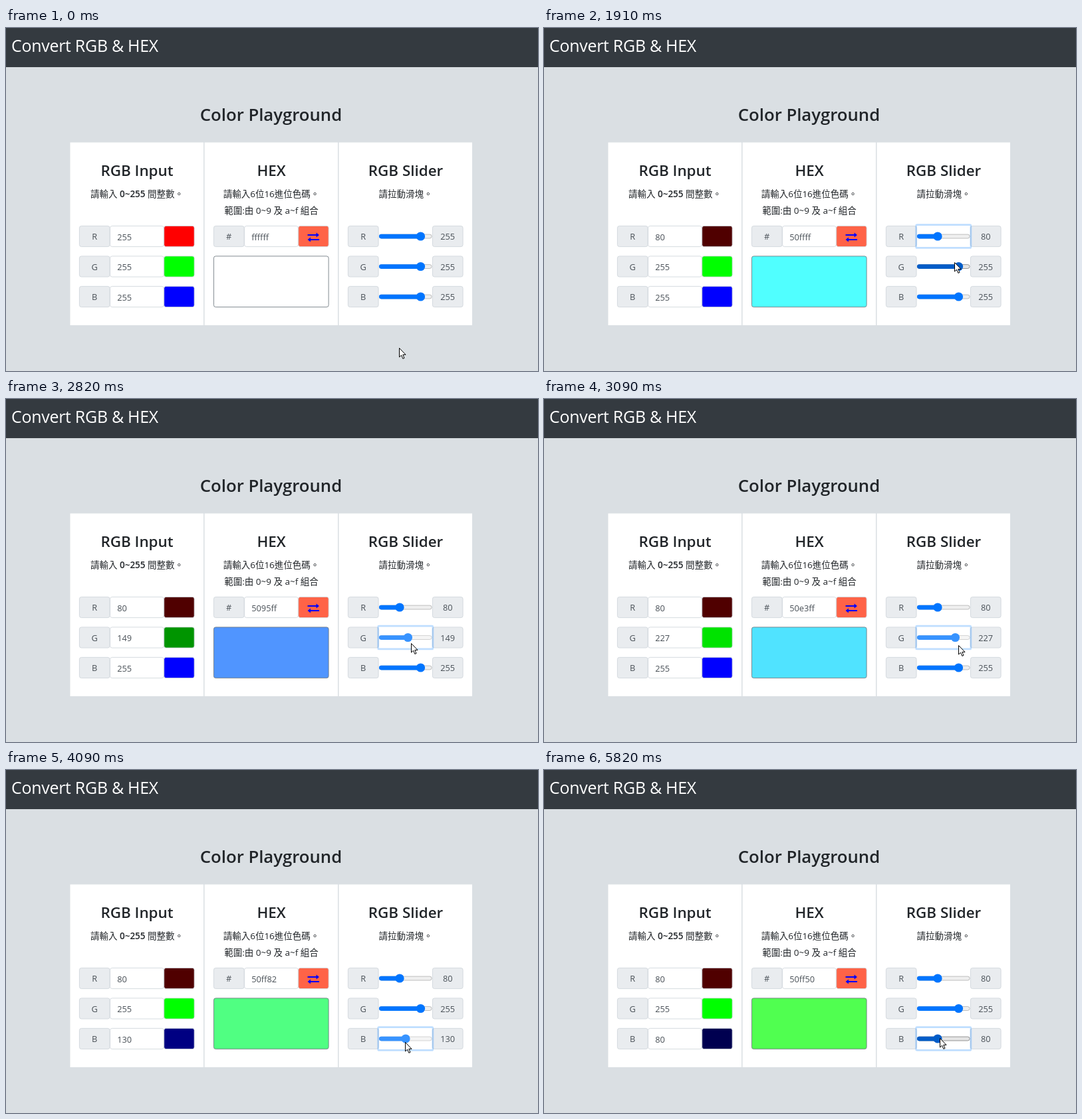
Recreate the animation shown at these times as an HTML page. Size 800 by 517 pixels, loop 6 s.

```html
<!DOCTYPE html>
<html lang="zh-Hant">
<head>
<meta charset="utf-8">
<title>Convert RGB &amp; HEX</title>
<style>
  html, body { margin: 0; width: 100%; height: 100%; overflow: hidden; background: #dadfe3; }
  svg { display: block; width: 800px; height: 517px; }
  text { font: 12.8px "Open Sans", "Noto Sans", sans-serif; fill: #495057; white-space: pre; }
  .nav { font-size: 24.9px; letter-spacing: -.01em; fill: #fff; }
  .title { font-size: 25.7px; font-weight: 600; fill: #212529; }
  .heading { font-size: 22.4px; font-weight: 600; fill: #212529; }
  .note { font: 13.5px "Open Sans", "Noto Sans CJK TC", "Noto Sans CJK JP", "Noto Sans CJK", sans-serif; fill: #212529; }
  .note tspan { font-weight: 600; }
  .mid { text-anchor: middle; }
  .box { stroke: #ced4da; stroke-width: .84; fill: #fff; }
  .addon { fill: #e9ecef; }
  .swap { fill: #ff6347; }
  .preview { stroke: #6c757d; }
  .ring { fill: none; stroke: #007bff; stroke-opacity: .25; stroke-width: 2.7; }
</style>
</head>
<body>
<svg id="stage" viewBox="0 0 800 517"></svg>
<script>
const LOOP = 6000, FPS = 11;
const NAMES = ['R', 'G', 'B'];
const ROW = 32, TRACK = { left: 561, right: 640.5 };
const rowTop = i => 298 + 45.5 * i;

const stage = document.getElementById('stage');
const $ = id => document.getElementById(id);
const set = (id, attrs) => Object.entries(attrs).forEach(([k, v]) => $(id).setAttribute(k, v));

const box = (cls, x, y, w, h = ROW, id = '') =>
  `<rect class="box ${cls}" id="${id}" x="${x + .4}" y="${y + .4}" width="${w - .8}" height="${h - .8}" rx="3"/>`;
const text = (cls, x, y, str, id = '') =>
  `<text class="${cls}" id="${id}" x="${x}" y="${y}">${str}</text>`;
const addon = (x, y, str, id) =>
  box('addon', x, y, 46.5) + text('mid', x + 23.2, y + 21, str, id);
const field = (x, y, str, id) =>
  box('', x, y, 81.5) + text('', x + 11, y + 21.8, str, id);

const inputRow = (name, i) => {
  const y = rowTop(i);
  return addon(110, y, name) + field(156.2, y, '', 'input' + i) + box('', 237.3, y, 46.2, ROW, 'swatch' + i);
};

const sliderRow = (name, i) => {
  const y = rowTop(i), cy = y + ROW / 2, { left, right } = TRACK;
  return addon(514, y, name) + addon(641, y, '', 'value' + i) +
    `<rect id="track${i}" x="${left + .4}" y="${cy - 2.9}" width="${right - left - .8}" height="5.9" rx="2.9" stroke-width=".84"/>
     <rect id="fill${i}" x="${left}" y="${cy - 3.3}" height="6.7" rx="3.3"/>
     <circle id="thumb${i}" cy="${cy}" r="6.6"/>
     <rect id="ring${i}" class="ring" x="${left - 1.4}" y="${y - 1.4}" width="${right - left + 2.8}" height="${ROW + 2.8}" rx="1.5"/>`;
};

stage.innerHTML = `
  <rect width="800" height="517" fill="#dadfe3"/>
  <rect width="800" height="59" fill="#343a40"/>` +
  text('nav', 8, 36, 'Convert RGB &amp; HEX') +
  text('title mid', 398.5, 139.5, 'Color Playground') +
  ['RGB Input', 'HEX', 'RGB Slider'].map((name, i) =>
    `<rect x="${96.5 + 202 * i}" y="172.5" width="200.5" height="275.5" fill="#fff"/>` +
    text('heading mid', 197 + 202 * i, 223, name)).join('') +
  text('note mid', 197, 255, '請輸入 <tspan>0~255</tspan> 間整數。') +
  text('note mid', 399, 255, '請輸入6位16進位色碼。') +
  text('note mid', 399, 279.5, '範圍:由 0~9 及 a~f 組合') +
  text('note mid', 601, 255, '請拉動滑塊。') +
  NAMES.map(inputRow).join('') +
  addon(312, rowTop(0), '#') + field(358.2, rowTop(0), '', 'hex') +
  box('swap', 439.3, rowTop(0), 46.2) +
  `<path d="M453.5 311H466.5V308.5L471 312L466.5 315.5V313H453.5Z
            M471 318H458V315.5L453.5 319L458 322.5V320H471Z" fill="#00f"/>` +
  box('preview', 312, rowTop(1), 173.5, 77.5, 'preview') +
  NAMES.map(sliderRow).join('') +
  `<path id="cursor" d="M.5 .5V14L3.6 11.2L5.8 16.4L8 15.5L5.8 10.4H10Z" fill="#fff" stroke="#000"/>`;

// Each leg eases towards its end point: [first step, last step, ...end]
const POINTER = [
  [0, 7, 621, 313], [9, 14, 592, 316],
  [17, 22.3, 622, 359], [24, 27, 595, 364], [28, 34, 623, 371],
  [35, 39, 622, 409], [39.1, 48, 592, 411],
  [56, 57, 631, 408], [57, 58, 624, 403], [61, 64, 595, 404]
];
const CHANNELS = [
  { press: 10, release: 18, legs: [[9, 14, 85], [17, 18, 80]] },
  { press: 25, release: 37, legs: [[24, 27, 104], [28, 36.3, 255]] },
  { press: 39, release: 54, legs: [[39.1, 48, 85], [53, 54, 80]] }
];
const PALETTE = {
  idle: ['#0075ff', '#efefef', '#b2b2b2'],
  hover: ['#005cc8', '#e5e5e5', '#858585'],
  drag: ['#3793ff', '#f5f5f5', '#cbcbcb']
};

const ease = p => p * p * (3 - 2 * p);
const travel = (from, legs, step) => legs.reduce((pos, [first, last, ...end]) => {
  const p = ease(Math.min(1, Math.max(0, (step - first) / (last - first))));
  return pos.map((v, i) => v + (end[i] - v) * p);
}, from);
const thumbX = value => 592 + (value - 80) * .18;

// Steps fall on an 11 fps clock rounded to 10 ms
function stepAt(ms) {
  const step = Math.floor(ms * FPS / 1000) + 1;
  return Math.round(step * 100 / FPS) * 10 > ms ? step - 1 : step;
}

function draw(step) {
  const [px, py] = travel([591, 482], POINTER, step);
  const focus = CHANNELS.filter(c => step >= c.press).length - 1;
  const dragging = focus >= 0 && step < CHANNELS[focus].release;

  const rgb = CHANNELS.map(({ legs }, i) => {
    const value = Math.round(travel([255], legs, step)[0]);
    const x = thumbX(value), y = rowTop(i);
    const over = px >= TRACK.left && px <= TRACK.right && py >= y && py <= y + ROW;
    const state = dragging ? (focus === i ? 'drag' : 'idle') : over ? 'hover' : 'idle';
    const [accent, track, edge] = PALETTE[state];
    $('input' + i).textContent = $('value' + i).textContent = value;
    $('swatch' + i).style.fill = `rgb(${NAMES.map((_, c) => c === i ? value : 0)})`;
    set('track' + i, { fill: track, stroke: edge });
    set('fill' + i, { width: x - TRACK.left, fill: accent });
    set('thumb' + i, { cx: x, fill: accent });
    set('ring' + i, { visibility: focus === i ? 'visible' : 'hidden' });
    return value;
  });

  $('hex').textContent = rgb.map(v => v.toString(16).padStart(2, '0')).join('');
  $('preview').style.fill = `rgb(${rgb})`;
  set('cursor', { transform: `translate(${Math.round(px)} ${Math.round(py)})` });
}

const start = performance.now();
function tick() {
  draw(stepAt((performance.now() - start) % LOOP));
  requestAnimationFrame(tick);
}
tick();
</script>
</body>
</html>
```
